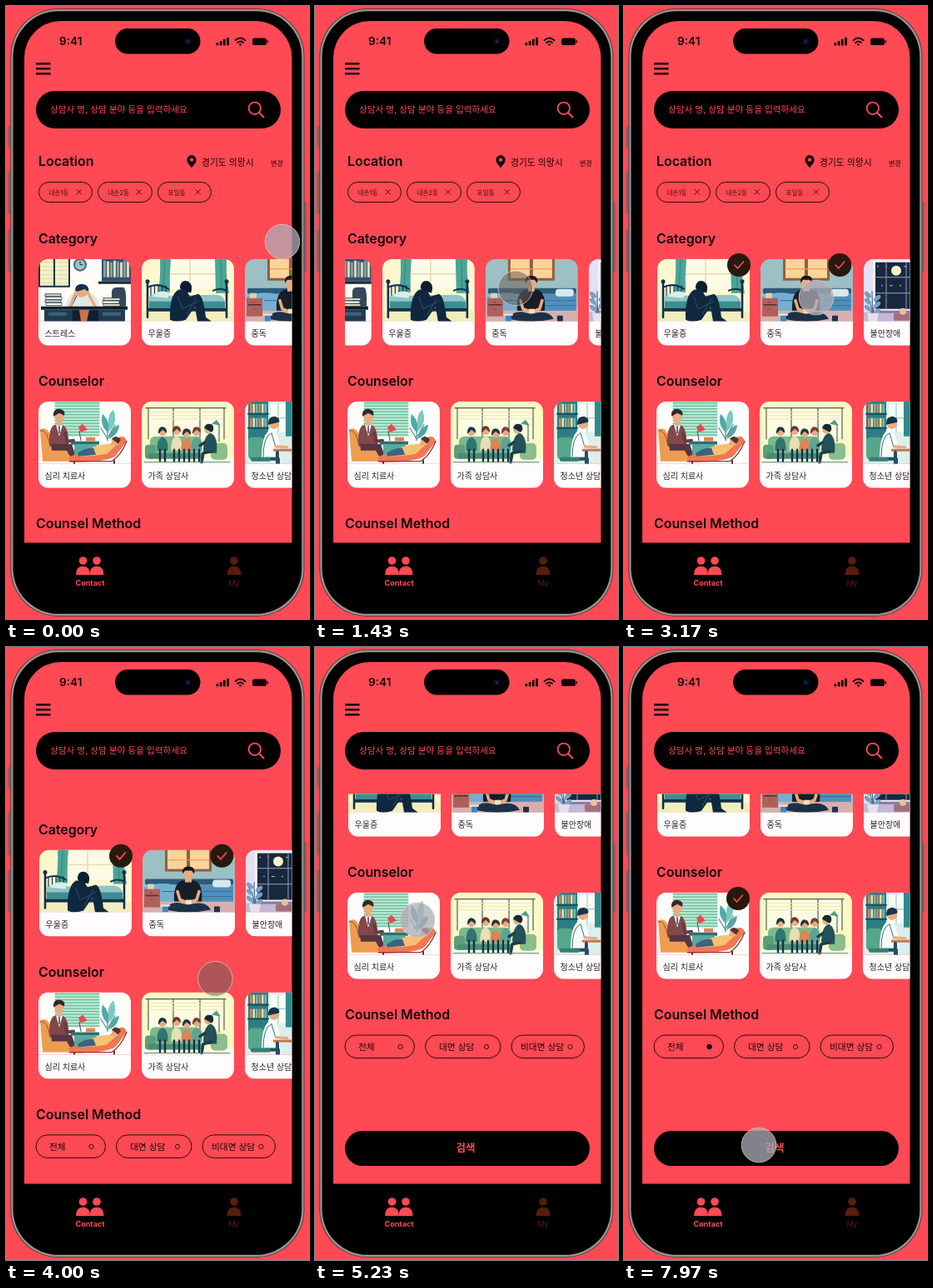
Animation, 364 px wide and 736 px high, one loop 8000 ms. Source, as an HTML page:

```html
<!DOCTYPE html>
<html lang="ko">
<head>
<meta charset="utf-8">
<title>Counselor search</title>
<style>
html, body { margin: 0; width: 100%; height: 100%; overflow: hidden; background: #ff4954; }
svg { display: block; width: 100%; height: 100%; }
text { font-family: Inter, "Noto Sans CJK KR", "Noto Sans CJK", sans-serif; white-space: pre; }
</style>
</head>
<body>
<svg id="stage" viewBox="0 0 364 736"></svg>
<script>
const RED = '#ff4954', INK = '#14304a', TEAL = '#4aa497', SKIN = '#e9ab80', BROWN = '#5a1c0c';

// SVG helpers
const rect = (x, y, w, h, fill, r = 0, more = '') =>
  `<rect x="${x}" y="${y}" width="${w}" height="${h}" rx="${r}" fill="${fill}" ${more}/>`;
const dot = (x, y, r, fill, more = '') => `<circle cx="${x}" cy="${y}" r="${r}" fill="${fill}" ${more}/>`;
const shape = (d, fill) => `<path d="${d}" fill="${fill}"/>`;
const line = (d, color, w = 1) =>
  `<path d="${d}" fill="none" stroke="${color}" stroke-width="${w}" stroke-linecap="round" stroke-linejoin="round"/>`;
const text = (x, y, size, str, fill = '#1c0507', weight = 400, anchor = 'start') =>
  `<text x="${x}" y="${y}" font-size="${size}" fill="${fill}" font-weight="${weight}" text-anchor="${anchor}">${str}</text>`;
const group = (body, x = 0, y = 0, more = '') => `<g transform="translate(${x} ${y})" ${more}>${body}</g>`;
const repeat = (n, f) => Array.from({ length: n }, (_, i) => f(i)).join('');
const pill = (x, y, w, h) =>
  rect(x, y, w, h, 'none', h / 2, 'stroke="#2c0a0d" stroke-width="1"');

// Illustrations, each 111 x 75
const stress =
  rect(0, 0, 111, 75, '#fdfcf6') + rect(0, 0, 37, 32, '#f5f0c4') +
  repeat(6, i => line(`M0 ${4 + i * 5}H36`, '#d8d2a4', .8)) +
  line('M1 0V33H37V0M19 0V33', INK, 2) +
  dot(50, 7, 8, '#456b78') + dot(50, 7, 6, '#9fc2c4') + line('M50 3V7H53', INK) +
  rect(76, 0, 35, 27, '#33506a') + repeat(8, i => rect(78 + i * 4, 2 + i % 3, 3, 20 - i % 3, i % 2 ? '#e5d8b0' : '#7fa1a6')) +
  rect(72, 27, 39, 3, '#1d2630') + shape('M88 57V40Q88 34 94 34H102Q106 36 105 57Z', '#34485a') +
  shape('M32 60Q34 42 46 40H59Q72 42 74 60Z', '#dfe8e6') + line('M39 58L46 44M69 58L61 44', INK) +
  dot(52, 39, 7, SKIN) + shape('M44 40Q43 30 52 30Q62 31 60 41L56 36Z', INK) +
  line('M38 57L45 40M68 57L59 40', SKIN, 3.5) +
  repeat(4, i => rect(8 + i % 2, 42 + i * 3.6, 19, 3, i % 2 ? '#fff' : '#d9cfa8', 0, `stroke="${INK}" stroke-width=".7"`)) +
  repeat(3, i => rect(78 - i % 2, 47 + i * 3.4, 20, 3, i % 2 ? '#fff' : '#e0d7b8', 0, `stroke="${INK}" stroke-width=".7"`)) +
  rect(3, 57, 104, 4, '#101d2c') + rect(7, 61, 34, 14, '#1f3b52') + rect(72, 61, 32, 14, '#1f3b52') +
  rect(12, 64, 22, 4, '#3f6173') + rect(77, 64, 22, 4, '#3f6173') + rect(41, 61, 31, 14, '#11202f') +
  shape('M49 61L51 75H58L61 61Z', '#cb724b');

const bed =
  line('M7 28V70M102 28V70', INK, 2.6) + dot(7, 27, 2.5, INK) + dot(102, 27, 2.5, INK) +
  line('M7 34Q20 28 32 36M102 38Q94 34 86 38', INK, 2) +
  repeat(5, i => line(`M${11 + i * 4.5} 32V48`, INK, 1.2)) +
  shape('M9 45Q20 37 32 44L90 43Q99 44 100 52V59H9Z', '#8ec5c6') +
  rect(9, 51, 91, 8, '#3e8d93') + rect(8, 59, 94, 4, INK) + shape('M12 45Q21 35 34 41L31 47Z', '#d9edea');

const sorrow =
  rect(0, 0, 111, 75, '#fbf8cf') + rect(32, 0, 56, 36, '#fdfbe6') +
  line('M58 0V36M32 18H88', '#e2dcae', 1.5) +
  shape('M22 0H35Q33 20 34 40H20Q23 20 22 0Z', TEAL) + shape('M88 0H102Q101 22 105 41H89Z', TEAL) +
  line('M28 0L26 39M95 0L96 39', '#2e7f79', .8) + rect(0, 63, 111, 12, '#f2edbd') + bed +
  shape('M34 73Q33 43 44 37Q54 36 58 45L68 42Q74 44 77 70L84 75H67L64 57L53 73Q41 77 34 73Z', '#10283f') +
  dot(53, 34, 7, '#10283f') + shape('M46 34Q47 24 56 27Q62 32 59 41Z', '#0b1d30') +
  line('M44 46L49 60L68 51M54 67L65 48', '#2d506a', 1);

const habit =
  rect(0, 0, 111, 75, '#9cc0c4') + rect(27, 0, 56, 26, '#8f5f42') +
  rect(30, 0, 23, 23, '#fbd49a') + rect(57, 0, 23, 23, '#fbd49a') + line('M30 12H80', '#ef9f55', 1.2) +
  rect(0, 57, 111, 18, '#d5b0ac') + rect(3, 35, 106, 7, '#2d5a78', 2) +
  shape('M2 45Q20 38 37 42H109V62H2Z', '#74aed0') + shape('M70 42H109V62H65Z', '#4f8fbb') +
  line('M24 50H40M72 50H108M70 56H108', '#356f97', 1) +
  rect(84, 36, 22, 9, '#d8e9ec', 4) + rect(2, 47, 19, 22, '#b0605a') + line('M4 55H19M11 52V52M11 60V60', '#5b2a30', 1.5) +
  rect(6, 41, 8, 6, '#e4cfae') +
  shape('M38 62Q37 41 47 37H63Q73 41 71 62Z', '#171d27') + rect(51, 31, 8, 8, SKIN) +
  dot(55, 29, 6.3, SKIN) + shape('M48 29Q47 20 55 20Q64 20 62 29L59 25H51Z', '#151920') +
  line('M42 50L45 60L53 63M68 50L65 60L57 63', SKIN, 3.6) +
  shape('M28 72Q33 60 50 65L55 66Q76 60 82 72Q55 78 28 72Z', '#1c3148') + rect(52, 60, 7, 5, '#f1e3c1') +
  rect(24, 67, 7, 8, '#3d86c5', 1) + rect(22, 66, 11, 2, '#e6edf0') + rect(86, 68, 7, 7, '#1c3148', 1);

const worry =
  rect(0, 0, 111, 75, '#e4dff2') + rect(11, 2, 58, 61, '#f6f3fb') + rect(14, 4, 52, 56, '#17283e') +
  dot(39, 14, 6, '#f9f3cc') + repeat(11, i => dot(17 + i * 17 % 46, 9 + i * 23 % 46, .8, '#cfd5e8')) +
  line('M27 4V60M51 4V60M14 22H66M14 41H66', '#8089a4', 1.2) +
  rect(0, 64, 111, 11, '#c4b7d6') + rect(8, 62, 64, 3, '#86799f') +
  line('M11 68Q9 51 3 44M11 68Q12 52 20 46M11 68L10 39', '#4a7190', 1.2) +
  repeat(6, i => `<ellipse cx="${5 + i % 2 * 11}" cy="${43 + i * 4}" rx="5" ry="2.6" fill="#7b9fc0" transform="rotate(${i % 2 ? -40 : 40} ${5 + i % 2 * 11} ${43 + i * 4})"/>`) +
  shape('M4 65H18L16 75H6Z', '#e6e0ec') + rect(36, 65, 20, 9, '#a46f7d', 2) + dot(47, 63, 4, '#e9c29e');

const therapy =
  rect(0, 0, 111, 75, '#fcfdf9') + rect(20, 0, 53, 42, '#bfe8cf') +
  repeat(12, i => line(`M20 ${2 + i * 3.5}H73`, '#5fbd9f', 1.3)) +
  line('M83 47Q82 30 87 16M83 45L75 32M84 42L92 28', '#2b6d73', 1) +
  shape('M84 38Q73 29 77 15Q87 24 84 38Z', '#4fa9a6') + shape('M85 36Q81 17 90 10Q96 25 85 36Z', '#7bc9c3') +
  shape('M84 45Q87 31 97 28Q96 41 84 45Z', '#4fa9a6') +
  shape('M2 34Q12 28 16 47L37 52V72H5Z', '#ef9c50') + line('M2 35Q11 33 14 54H37', '#9a4f32', 1) +
  shape('M13 53Q12 30 20 28H29Q37 32 36 53Z', '#82484a') + shape('M21 28L25 42L29 28Z', '#fff') + line('M25 30V38', '#23395a', 1.5) +
  shape('M15 51H40L46 70H40L34 59H16Z', '#573542') + rect(22, 22, 6, 7, SKIN) + dot(25, 18, 6, SKIN) +
  shape('M18 18Q17 9 25 9Q33 10 31 17L25 14Z', '#33272d') + line('M32 38L34 48L42 47', '#6d3940', 4) +
  rect(39, 48, 34, 4, '#297076') + rect(43, 52, 27, 13, '#58a99f') + rect(57, 43, 11, 5, '#d9895a') +
  line('M51 47L49 36L54 31', '#803140') + shape('M48 31L53 27L59 34L51 37Z', '#e34b52') +
  shape('M36 67Q54 59 72 63L96 43Q104 40 106 48L93 65Q84 73 38 73Z', '#ef7852') +
  line('M37 72H88Q99 65 106 48', '#8e3440', 1.3) +
  shape('M48 62Q68 52 84 51L94 52L82 63Q68 66 48 66Z', '#f8c071') + shape('M47 62Q58 55 66 56L69 64L48 66Z', '#3a6482') +
  dot(93, 48, 5, SKIN) + shape('M88 45Q93 39 99 46L96 51Z', '#5a2f31') + line('M43 73V75M91 71V75', '#612b35', 2);

const member = (x, y, top, hair) =>
  shape(`M${x - 6.5} 59Q${x - 7} ${y + 7} ${x} ${y + 6}Q${x + 7} ${y + 7} ${x + 6.5} 59Z`, top) + dot(x, y, 4.4, SKIN) +
  shape(`M${x - 5} ${y + 2}Q${x - 5.5} ${y - 6.5} ${x} ${y - 6.5}Q${x + 5.5} ${y - 6} ${x + 5} ${y + 1}L${x} ${y - 3}Z`, hair) +
  line(`M${x - 3} 58V72M${x + 3} 58V72`, INK, 2.4);

const family =
  rect(0, 0, 111, 75, '#faf8c4') + rect(7, 8, 93, 36, '#fdfbe0') + rect(0, 68, 111, 7, '#fdfcf0') +
  line('M5 8H101M8 8V45M99 8V45M38 8V44M70 8V44', '#4e604e', 1.2) +
  repeat(3, i => line(`M9 ${13 + i * 4}H98`, '#eee8ae', 1)) +
  rect(10, 42, 62, 23, '#7db98b', 6) + rect(4, 52, 13, 17, '#5b9f7c', 4) + rect(8, 62, 67, 7, '#4a8e72', 2) +
  member(25, 37, '#2f7471', '#193642') + member(42, 36, '#e8dfb8', '#6b3930') +
  member(54, 39, '#d98555', '#28363f') + member(66, 37, '#5ea394', '#773f2f') +
  line('M93 48V30L90 25', '#29514f', 1) + shape('M84 27L90 22L95 29Z', '#4d9d88') +
  rect(83, 50, 20, 20, '#8dbd8c', 5) + shape('M74 58Q75 40 83 38Q92 42 90 62H75Z', '#21515a') +
  dot(80, 34, 4.8, SKIN) + shape('M75 32Q77 25 85 28Q88 34 84 37Z', '#142c38') +
  line('M84 60L74 62L72 73M76 49L70 53', '#1b3f4c', 3.5) + line('M3 73H106', '#5f855f', 1);

const writer =
  shape('M20 60Q20 29 31 25Q43 28 42 55Z', '#f6faf9') + line('M22 58Q22 33 32 29L37 46L50 46', '#426a79', 1) +
  dot(35, 18, 6.2, SKIN) + shape('M28 19Q27 9 36 9Q43 11 41 16L32 18Z', '#183447') + line('M37 45L51 46', SKIN, 3);

const teen =
  rect(0, 0, 111, 75, '#dcefeb') + rect(4, 0, 24, 49, '#2c7d83') +
  repeat(12, i => rect(6 + i % 6 * 3.5, 3 + (i / 6 | 0) * 17, 2.5, 11, ['#d98554', '#eee0ae', '#73b9b0'][i % 3])) +
  line('M4 15H28M4 32H28', '#164c59', 2) + rect(31, 3, 18, 34, '#f9fcf5') + line('M40 3V37M31 20H49', '#8dc1ba', 1) +
  rect(49, 0, 42, 42, '#2f8a8c') + rect(4, 43, 19, 27, '#56a78a', 5) + group(writer, 0, 9) +
  rect(34, 57, 77, 3, '#c6774d') + line('M39 61V75M25 69H40V75', '#264d62', 4) + rect(7, 67, 24, 5, '#347f72', 2);

const card = (i, y, name, art) => group(
  `<g clip-path="url(#card)">${art}${rect(0, 75, 111, 29, '#fffcfd')}</g>` + text(7.5, 93.3, 10, name, '#222'),
  39 + i * 124, y);
const badge = (id, x, y) => group(
  dot(0, 0, 14, '#28190f') + line('M-5 0L-1.5 4L5.5 -4', RED, 1.6), x, y, `id="${id}" opacity="0"`);
const heading = (x, y, str) => text(x, y, 15.9, str, '#120406', 600);
const placeChip = (x, w, str) => {
  const c = x + w - 16;
  return pill(x, 211.5, w, 24) + text(x + 12, 226.5, 7.6, str, '#3c0d10') + line(`M${c - 2.5} 220.5l5.5 5.5m0 -5.5l-5.5 5.5`, '#3c0d10', .9);
};
const methodChip = (x, w, tx, cx, str) =>
  pill(x, 646, w, 27.5) + text(tx, 664, 10.7, str) + dot(cx, 660, 2.6, 'none', 'stroke="#2c0a0d" stroke-width=".9"');
const person = (x, fill) =>
  dot(x, 666, 4.8, fill) + shape(`M${x - 8.5} 683Q${x - 8.5} 672.5 ${x} 672.5T${x + 8.5} 683Z`, fill);

const content =
  heading(39, 192, 'Location') +
  shape('M223 179a5.6 5.6 0 0 1 5.6 5.6C228.6 189 225 191 223 194.5C221 191 217.4 189 217.4 184.6A5.6 5.6 0 0 1 223 179Z', '#120406') +
  dot(223, 184.6, 2.2, RED) + text(235, 192, 10.8, '경기도 의왕시') + text(318, 191.5, 8, '변경') +
  placeChip(39.5, 64, '내손1동') + placeChip(110.5, 65, '내손2동') + placeChip(182.5, 64, '포일동') +
  heading(39, 285, 'Category') +
  `<g clip-path="url(#row)"><g id="cards">${
    card(0, 303.7, '스트레스', stress) + card(1, 303.7, '우울증', sorrow) + card(2, 303.7, '중독', habit) +
    card(3, 303.7, '불안장애', worry) + badge('check1', 261, 311) + badge('check2', 382.3, 311)}</g></g>` +
  heading(39, 456, 'Counselor') +
  `<g clip-path="url(#row)">${
    card(0, 474.7, '심리 치료사', therapy) + card(1, 474.7, '가족 상담사', family) + card(2, 474.7, '청소년 상담사', teen)}</g>` +
  badge('check3', 137, 482) +
  heading(36, 627, 'Counsel Method') +
  methodChip(36, 83.5, 52, 102.5, '전체') + methodChip(132.5, 90.5, 149, 206, '대면 상담') +
  methodChip(236, 87.5, 247, 306.5, '비대면 상담') + dot(102.5, 660, 3, '#000', 'id="radio" opacity="0"') +
  rect(36, 761, 294, 42, '#000', 21) + text(181, 786, 12.5, '검색', RED, 700, 'middle');

const stage = document.getElementById('stage');
stage.innerHTML =
  `<defs><clipPath id="card">${rect(0, 0, 111, 104, '#fff', 12)}</clipPath>
  <clipPath id="row">${rect(36, 285, 308, 300, '#fff')}</clipPath>
  <clipPath id="view">${rect(22, 176.5, 321.5, 468, '#fff')}</clipPath></defs>` +
  rect(0, 0, 364, 736, RED) +
  [[144, 26], [198, 52], [268, 51]].map(([y, h]) => rect(2.5, y, 4, h, '#866267', 1)).join('') + rect(357, 235, 4, 84, '#866267', 1) +
  rect(5.3, 3, 353.2, 730, '#4e4143', 57.5) + rect(6.3, 4, 351.2, 728, '#9a9690', 56.5) + rect(8.5, 6.2, 346.8, 723.6, '#000', 54.5) +
  shape('M22 644.5V62A44 44 0 0 1 66 18H299.5A44 44 0 0 1 343.5 62V644.5Z', RED) +
  rect(131, 27, 102.5, 30.5, '#000', 15.2) + dot(218.5, 42.5, 4, '#080c24') + dot(218.5, 42.5, 1.5, '#1d2d68') +
  text(64, 47, 13.6, '9:41', '#120406', 600) +
  repeat(4, i => rect(252.5 + i * 4.2, 44 - i * 2.1, 2.8, 3.4 + i * 2.1, '#120406', .8)) +
  line('M275.5 41.2Q281.5 36 287.5 41.2M278 44Q281.5 41 285 44', '#120406', 1.9) + dot(281.5, 46.3, 1.4, '#120406') +
  rect(296, 38.5, 17, 8.5, '#120406', 2.6) + rect(313.7, 41, 1.3, 3.5, '#120406', .6) +
  repeat(3, i => rect(36, 68 + i * 6, 17.5, 2.5, '#120406')) +
  rect(36, 102, 294, 45, '#000', 22.5) + text(53, 128.3, 10.65, '상담사 명, 상담 분야 등을 입력하세요', RED) +
  dot(298.8, 122.8, 7.2, 'none', `stroke="${RED}" stroke-width="1.8"`) + line('M304 128L309.5 133.5', RED, 2) +
  `<g clip-path="url(#view)"><g id="scroll">${content}</g></g>` +
  person(92.5, RED) + person(109, RED) + text(101, 696, 9, 'Contact', RED, 700, 'middle') +
  person(274, BROWN) + text(274, 696, 9, 'My', BROWN, 400, 'middle') +
  '<circle id="touch" r="20.8" stroke="rgba(215,205,200,.75)" stroke-width="1"/>';

// Each track: rows of [time, value, ...], eased between rows
const touchPath = [
  [0, 332, 283], [230, 332, 283], [800, 323, 339], [900, 323, 339], [1765, 200, 339], [1850, 200, 339],
  [2180, 95, 350], [2380, 95, 350], [2880, 231, 350], [3230, 231, 350], [3600, 247, 460], [3720, 247, 460],
  [4450, 260, 273], [4600, 260, 273], [5430, 100, 337], [6150, 100, 337], [6740, 102, 480], [7350, 102, 480],
  [7920, 162, 598]];
const rowShift = [[900, 0], [1765, -123]];
const pageShift = [[3720, 0], [4450, -182], [4500, -182], [4750, -180]];
const presses = [[880, 1790], [2230, 2370], [2920, 3060], [3680, 4520], [5730, 5880], [6820, 6960]];
const released = [175, 172, 183, .75], pressed = [108, 98, 90, .55];

const ramp = (t, from, length) => Math.min(1, Math.max(0, (t - from) / length));
const at = (track, t) => {
  const n = track.findIndex(k => k[0] > t);
  if (n < 1) return (n ? track[track.length - 1] : track[0]).slice(1);
  const a = track[n - 1], b = track[n];
  const u = (t - a[0]) / (b[0] - a[0]), e = u * u * (3 - 2 * u);
  return a.slice(1).map((v, i) => v + (b[i + 1] - v) * e);
};
const el = id => document.getElementById(id);
const touch = el('touch'), cards = el('cards'), page = el('scroll');
const reveals = [['check1', 2340], ['check2', 3020], ['check3', 5840], ['radio', 6920]].map(([id, t]) => [el(id), t]);

function frame() {
  const t = performance.now() % 8000;
  const [x, y] = at(touchPath, t);
  const press = Math.max(...presses.map(([a, b]) => ramp(t, a, 70) - ramp(t, b, 70)));
  touch.setAttribute('cx', x);
  touch.setAttribute('cy', y);
  touch.setAttribute('fill', `rgba(${released.map((v, i) => v + (pressed[i] - v) * press)})`);
  cards.setAttribute('transform', `translate(${at(rowShift, t)[0]} 0)`);
  page.setAttribute('transform', `translate(0 ${at(pageShift, t)[0]})`);
  for (const [node, from] of reveals) node.setAttribute('opacity', ramp(t, from, 100));
  requestAnimationFrame(frame);
}
frame();
</script>
</body>
</html>
```
